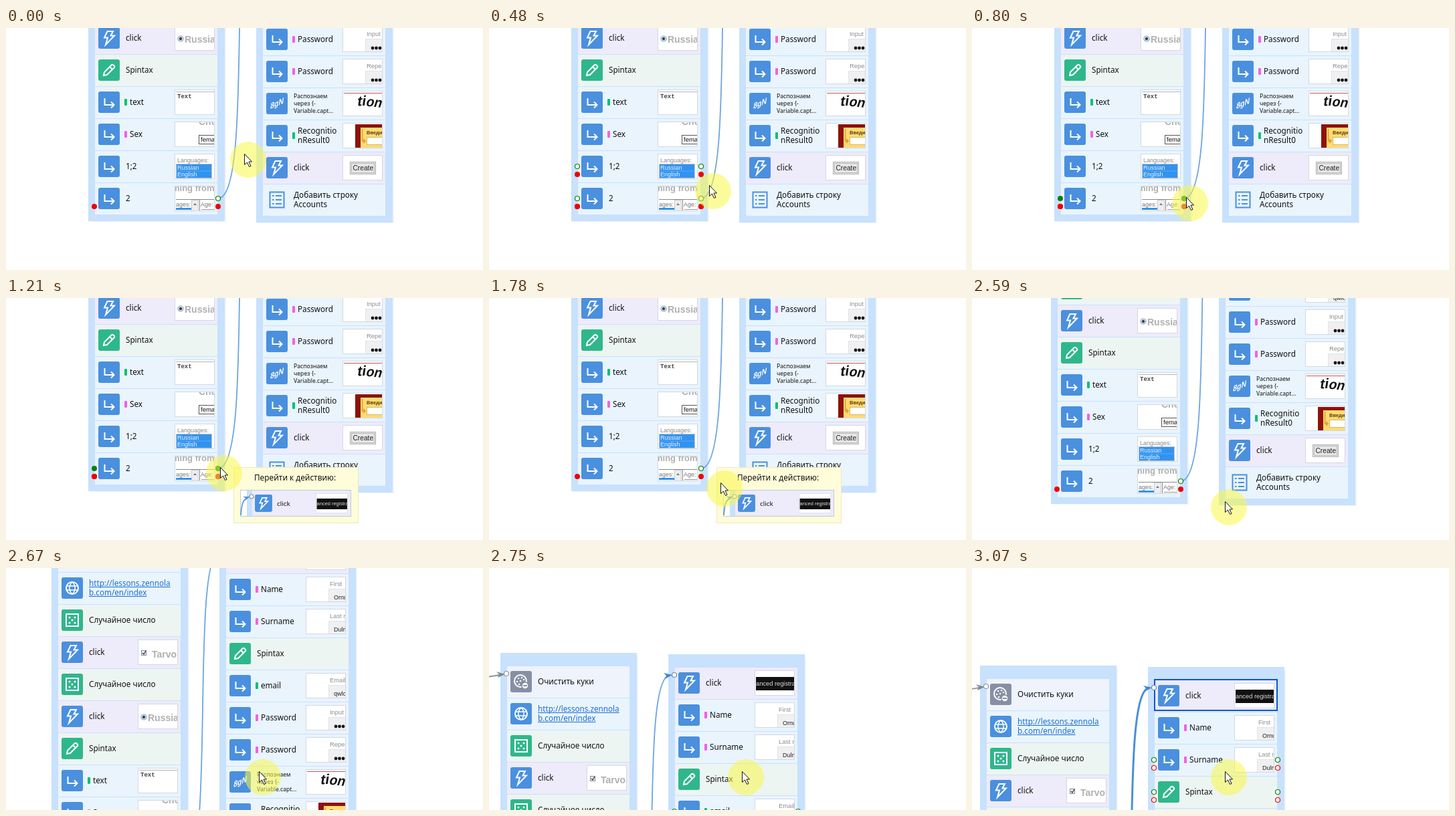
Recreate the animation shown at these times as an HTML page with a canvas. Size 713x362 px, loop 4330 ms.

```html
<!DOCTYPE html>
<html lang="ru">
<head>
<meta charset="utf-8">
<title>Action blocks</title>
<style>
  html, body { margin: 0; width: 100%; height: 100%; overflow: hidden; background: #fff; }
  canvas { display: block; }
</style>
</head>
<body>
<canvas id="stage" width="713" height="362"></canvas>
<script>
const ctx = document.getElementById('stage').getContext('2d');
const LOOP = 4330, STEP = 80, ROW = 48;
const UI = '"Noto Sans", sans-serif', ARIAL = '"Liberation Sans", sans-serif', MONO = '"Liberation Mono", monospace';
const BLUE = '#4a90de', GREEN = '#2fb78c', GREY = '#878fa5', PINK = '#f062e4', LIME = '#0fbf70';
const PLAIN = '#e9f4fd', LILAC = '#eeebfa', MINT = '#edf5f2', PALE = '#eff3fb';

// ---- drawing helpers ----
function rect(x, y, w, h, fill, stroke, lineWidth = 1) {
  if (fill) { ctx.fillStyle = fill; ctx.fillRect(x, y, w, h); }
  if (stroke) {
    ctx.strokeStyle = stroke;
    ctx.lineWidth = lineWidth;
    ctx.strokeRect(x + lineWidth / 2, y + lineWidth / 2, w - lineWidth, h - lineWidth);
  }
}
function dot(x, y, r, fill, stroke, lineWidth = 1.2) {
  ctx.beginPath();
  ctx.arc(x, y, r, 0, 7);
  if (fill) { ctx.fillStyle = fill; ctx.fill(); }
  if (stroke) { ctx.strokeStyle = stroke; ctx.lineWidth = lineWidth; ctx.stroke(); }
}
function text(s, x, y, size = 11.7, color = '#111', family = UI, weight = '') {
  ctx.font = `${weight} ${size}px ${family}`;
  ctx.fillStyle = color;
  ctx.fillText(s, x, y);
}
function line(d, color, lineWidth) {
  ctx.strokeStyle = color;
  ctx.lineWidth = lineWidth;
  ctx.stroke(new Path2D(d));
}
function shape(d, color) {
  ctx.fillStyle = color;
  ctx.fill(new Path2D(d));
}
function at(x, y, draw) {
  ctx.save();
  ctx.translate(x, y);
  draw();
  ctx.restore();
}

// ---- icons, centred on 0,0 ----
function tile(color) {
  ctx.beginPath();
  ctx.roundRect(-16, -16, 32, 32, 3);
  ctx.fillStyle = color;
  ctx.fill();
}
const white = (d, w = 2) => line(d, '#fff', w);
const icons = {
  arrow() { tile(BLUE); white('M-6.5-6V4H7M3-.5L7.5 4L3 8.5'); },
  bolt() { tile(BLUE); white('M-2.5-10H6L2.5-3.5H8L-5 10L-2-.5H-7Z'); },
  pencil() { tile(GREEN); white('M-8 8L-7 3L3.5-7.5Q5-9 6.5-7.5L7.5-6.5Q9-5 7.5-3.5L-3 7ZM1-5L5-1'); },
  globe() {
    tile(BLUE);
    dot(0, 0, 9, null, '#fff', 2);
    white('M-9-3H9M-9 3H9M0-9C-5.5-4-5.5 4 0 9M0-9C5.5-4 5.5 4 0 9', 1.5);
  },
  dice() {
    tile(GREEN);
    white('M-9-9H9V9H-9Z');
    for (const [x, y] of [[-4, -4], [4, -4], [0, 0], [-4, 4], [4, 4]]) dot(x, y, 1.5, '#fff');
  },
  cookie() {
    tile(GREY);
    dot(-1, -1, 9, null, '#fff', 2);
    for (const [x, y] of [[-4, -5], [1, -6], [-6, 0], [-1, -1], [4, -3], [-3, 4]]) dot(x, y, 1.3, '#fff');
    dot(6, 6, 5, '#fff', GREY, 1.5);
    line('M3 6H9', GREY, 2);
  },
  captcha() {
    tile(BLUE);
    ctx.transform(.8, -.35, -.15, 1, 0, 0);
    text('8gN', -12, 4, 13, '#fff', ARIAL, 'bold');
  },
  list() {
    line('M-10.5-11.5H10.5V11.5H-10.5Z', BLUE, 2);
    line('M-7-6H-4.5M-2-6H7M-7 0H-4.5M-2 0H7M-7 6H-4.5M-2 6H7', BLUE, 2);
  }
};

// ---- thumbnails, 60 x 38 from their top left corner ----
const small = (s, x, y, color = '#929292', size = 9) => text(s, x, y, size, color, ARIAL);
const heading = (s, x, y, size = 14) => text(s, x, y, size, '#b0b0b0', ARIAL, 'bold');
const field = (label, value) => () => {
  small(label, 36, 14, '#8c8c8c', 9.4);
  rect(34, 18, 30, 24, '#f0f0f2', '#dfe3ea');
  small(value, 42, 34, '#222');
};
const secret = label => () => {
  field(label, '')();
  for (let i = 0; i < 4; i++) dot(45 + i * 5.5, 32, 2.4, '#111');
};
function band() {
  rect(2, 10, 57, 20, '#111');
  small('anced registra', 2, 23, '#ddd', 9.3);
}
const thumbs = {
  band,
  first: field('First', 'Ornu'),
  last: field('Last n', 'Dulm'),
  email: field('Email', 'qwlo'),
  input: secret('Input'),
  repeat: secret('Repe'),
  checkbox() {
    rect(5, 16, 8, 8, '#eef2f8', '#7d8ba0');
    line('M7 20L9 22L12 17', '#333', 1.3);
    heading('Tarvo', 21, 27);
  },
  radio() {
    dot(9, 20, 4, '#dfe9f5', '#8fa0b5');
    dot(9, 20, 2.2, '#25435f');
    heading('Russian', 15, 26);
  },
  textarea() {
    rect(2, 3, 58, 1, '#b5b5b5');
    text('Text', 4, 13, 9, '#444', MONO, 'bold');
  },
  gender() {
    heading('Cho', 36, 5);
    rect(36, 20, 30, 14, '#fff', '#555');
    small('female', 39, 30, '#111', 9.5);
  },
  languages() {
    small('Languages:', 4, 13, '#888');
    rect(2, 15, 54, 22, '#fff', '#c4c4c4');
    rect(3, 16, 52, 20, '#3193f0');
    small('Russian', 4, 24, '#e8f4ff');
    small('English', 4, 34, '#e8f4ff');
    line('M3 26H55', '#7dbaf2', .6);
  },
  ages() {
    heading('ming from', -4, 8, 13);
    line('M2 20.5H60M37.5 20V38', '#888', 1);
    small('ages:', 2, 31, '#777');
    rect(2, 33, 23, 3, '#3193f0');
    rect(25, 21, 11, 17, '#eceef2', '#ccc');
    shape('M28 29L30.5 26L33 29Z', '#777');
    small('Age:', 39, 31, '#777');
    rect(40, 35, 20, 1, '#999');
  },
  warped() {
    rect(2, 3, 58, 1, '#c9564a');
    at(20, 20, () => {
      ctx.transform(1, -.08, -.15, 1, 0, 0);
      text('ti', 2, 3, 21, '#111', ARIAL, 'bold');
      ctx.rotate(.18);
      text('on', 15, 1, 20, '#111', ARIAL, 'bold');
    });
  },
  result() {
    rect(19, 2, 41, 36, '#8d1208');
    rect(27, 7, 33, 30, '#ffdc72');
    text('Введи', 36, 17, 7.5, '#5b3a10', ARIAL, 'bold');
    rect(36, 21, 26, 12, '#fff', '#d8b760');
    line('M29.5 9V27H34M31 24L34 27L31 30', '#e0a43c', 1.8);
  },
  create() {
    rect(11, 10, 39, 19, '#e7e7e7', '#b0b0b0');
    ctx.setLineDash([1, 1]);
    rect(13, 12, 35, 15, null, '#888');
    small('Create', 15.5, 23, '#222', 10.2);
  }
};

// ---- panels: background, icon, text lines, thumbnail, label bar ----
const left = { x: 123, y: -268, rows: [
  [PALE, 'cookie', ['Очистить куки']],
  [PLAIN, 'globe', ['http://lessons.zennola', 'b.com/en/index']],
  [MINT, 'dice', ['Случайное число']],
  [LILAC, 'bolt', ['click'], 'checkbox'],
  [MINT, 'dice', ['Случайное число']],
  [LILAC, 'bolt', ['click'], 'radio'],
  [MINT, 'pencil', ['Spintax']],
  [PLAIN, 'arrow', ['text'], 'textarea', LIME],
  [PLAIN, 'arrow', ['Sex'], 'gender', PINK],
  [PLAIN, 'arrow', ['1;2'], 'languages'],
  [PLAIN, 'arrow', ['2'], 'ages']
] };
const right = { x: 374, y: -266, rows: [
  [LILAC, 'bolt', ['click'], 'band'],
  [PLAIN, 'arrow', ['Name'], 'first', PINK],
  [PLAIN, 'arrow', ['Surname'], 'last', PINK],
  [MINT, 'pencil', ['Spintax']],
  [PLAIN, 'arrow', ['email'], 'email', LIME],
  [PLAIN, 'arrow', ['Password'], 'input', PINK],
  [PLAIN, 'arrow', ['Password'], 'repeat', PINK],
  [PLAIN, 'captcha', ['Распознаем', 'через {-', 'Variable.capt...'], 'warped'],
  [PLAIN, 'arrow', ['Recognitio', 'nResult0'], 'result', LIME],
  [LILAC, 'bolt', ['click'], 'create'],
  [PLAIN, 'list', ['Добавить строку', 'Accounts']]
] };

function drawRow([background, icon, lines, thumb, bar]) {
  rect(0, 0, 183, ROW, background);
  rect(0, 0, 183, 1, '#c8e1fd');
  at(21, 24, icons[icon]);
  if (bar) {
    ctx.beginPath();
    ctx.roundRect(44, 19, 4, 10, 1);
    ctx.fillStyle = bar;
    ctx.fill();
  }
  const tiny = lines.length > 2, pitch = tiny ? 11 : 14, isLink = icon === 'globe';
  lines.forEach((s, i) => {
    const x = bar ? 52 : 46;
    const y = 28 + (i - (lines.length - 1) / 2) * pitch - (tiny ? 1 : 0);
    text(s, x, y, tiny ? 8.6 : 11.7, isLink ? '#1b6fd0' : '#111');
    if (isLink) rect(x, y + 1, ctx.measureText(s).width, 1, '#1b6fd0');
  });
  if (thumb) at(119, 5, () => {
    rect(0, 0, 60, 38, '#fff', '#d3d9e2');
    ctx.beginPath();
    ctx.rect(1, 1, 58, 36);
    ctx.clip();
    thumbs[thumb]();
  });
}

function drawPanel({ x, y, rows }) {
  rect(x + 4, y + 5, 202, 553, '#f1f4f8');
  rect(x, y, 204, 557, '#c8e1fd');
  rows.forEach((row, i) => at(x + 10, y + 19 + i * ROW, () => drawRow(row)));
}

const port = (x, y, color, filled) => filled ? dot(x, y, 4, color) : dot(x, y, 3.5, '#fff', color);
const RED = '#f00000', DARK_GREEN = '#0a800a';

function drawPorts(panel, row, redFilled, greenFilled) {
  const y = panel.y + 43 + row * ROW;
  for (const x of [panel.x + 9, panel.x + 194]) {
    port(x, y, DARK_GREEN, greenFilled);
    port(x, y + 12, RED, redFilled);
  }
}

function drawLinks(selected) {
  const color = selected ? '#4c8fda' : '#6ca5e4';
  line('M317 255C372 255 327-235 377-235', color, selected ? 3 : 1.8);
  shape('M380-235L367-238L371-234L369-229Z', '#4585d4');
  line('M75-229Q100-231 128-236', '#919aa1', 1.8);
  shape('M130-236L117-240L121-236L119-231Z', '#818b93');
  dot(132, -237, 3.5, '#fff', '#8a949c');
  dot(383, -235, 3.5, '#fff', '#6c8cab');
}

function drawTooltip() {
  rect(340, 253, 187, 84, '#fffcd9', '#eeeac0');
  text('Перейти к действию:', 371, 273, 11.8);
  rect(350, 287, 166, 40, '#fff', '#bfcbd8');
  rect(360, 288, 8, 38, '#c8e1fd');
  rect(368, 288, 147, 38, LILAC);
  line('M351 325C352 312 353 302 361 299', BLUE, 1.5);
  shape('M365 297L354 297L358 299L357 303Z', BLUE);
  dot(367, 297, 3, '#fff', '#8a949c');
  at(385, 307, () => { ctx.scale(.81, .81); icons.bolt(); });
  text('click', 405, 311, 9.8);
  at(463, 292, () => {
    rect(0, 0, 48, 30, '#fff', '#dfe3ea');
    ctx.beginPath();
    ctx.rect(1, 1, 46, 28);
    ctx.clip();
    ctx.scale(.8, .8);
    band();
  });
}

function drawCursor(x, y) {
  dot(x + 6, y + 9, 27, 'rgba(250,248,70,.54)');
  at(x + .5, y + .5, () => {
    const arrow = 'M0 0V16L4 12.5L7 19L9.5 18L6.5 11.5H11Z';
    shape(arrow, '#fff');
    line(arrow, '#111', 1);
  });
}

// ---- motion ----
// Progress from 0 to 1, advancing in whole steps.
function progress(t, start, duration) {
  const stepped = Math.floor((t - start) / STEP) * STEP;
  return Math.min(1, Math.max(0, stepped / duration));
}
const smooth = p => p * p * (3 - 2 * p);
const easeOut = p => 1 - (1 - p) ** 1.25;
const steep = p => p < .5 ? (2 * p) ** 3.44 / 2 : 1 - (2 - 2 * p) ** 3.44 / 2;

function draw(t) {
  const toPort = smooth(progress(t, 0, 720));
  const toPanel = easeOut(progress(t, 1540, 640));
  const scroll = steep(progress(t, 2510, 320));
  const during = (from, to) => t >= from && t < to;
  const selected = t >= 3070;

  rect(0, 0, 713, 362, '#fff');
  at(Math.round(-111 * scroll), Math.round(414 * scroll), () => {
    drawPanel(left);
    drawPanel(right);
    if (selected) rect(383, -248, 185, 48, null, '#0a58cf', 2);
    drawLinks(selected);

    port(317, 255, DARK_GREEN);
    port(132, 267, RED, true);
    port(317, 267, RED, true);
    if (during(400, 640)) drawPorts(left, 9, true);
    if (during(400, 1700)) drawPorts(left, 10, true, during(640, 1620));
    if (during(2750, 2830)) drawPorts(right, 4);
    if (t >= 2910) { drawPorts(right, 2); drawPorts(right, 3); }
  });
  if (during(1210, 2180)) drawTooltip();
  // The way to the port bends slightly: y lags behind x.
  drawCursor(
    Math.round(356 - 36 * toPort ** .9 + 58 * toPanel),
    Math.round(188 + 65 * toPort ** 1.1 + 51 * toPanel));
}

function frame(now) {
  draw(now % LOOP);
  requestAnimationFrame(frame);
}
draw(0);
requestAnimationFrame(frame);
</script>
</body>
</html>
```
